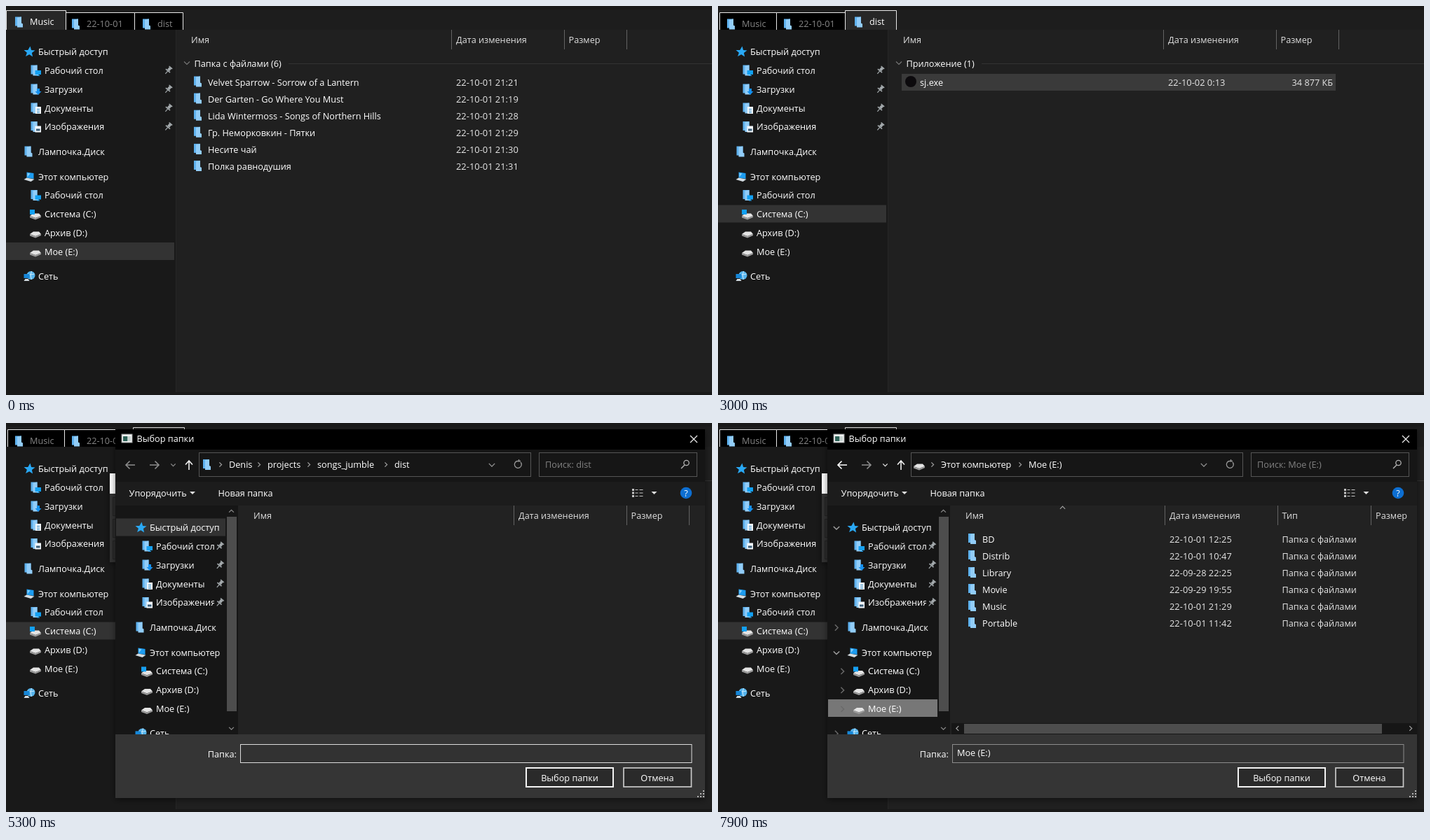
An HTML page for the animation above (8 s loop, 1007 by 556 pixels).

```html
<!DOCTYPE html>
<html lang="ru">
<head>
<meta charset="utf-8">
<title>File manager</title>
<style>
html, body { margin: 0; width: 100%; height: 100%; overflow: hidden; background: #202020; }
svg { display: block; width: 1007px; height: 556px; font-family: "Open Sans", "Noto Sans", sans-serif; }
text { white-space: pre; }
</style>
</head>
<body>
<svg id="stage" viewBox="0 0 1007 556" xmlns="http://www.w3.org/2000/svg"></svg>
<script>
const LOOP = 8000, STEP = 100;

// Drawing helpers
const txt = (x, y, s, { c = '#fff', z = 12.7, a = 'start' } = {}) =>
  `<text x="${x}" y="${y + 4.6}" fill="${c}" font-size="${z}" text-anchor="${a}">${s}</text>`;
const date = (x, y, s) => txt(x, y, s, { z: 12.9, c: '#e6e6e6' });
const named = id => id ? `id="${id}" ` : '';
const box = (x, y, x2, y2, fill, stroke = 'none', w = 1, id) =>
  `<rect ${named(id)}x="${x}" y="${y}" width="${x2 - x}" height="${y2 - y}" fill="${fill}" stroke="${stroke}" stroke-width="${w}"/>`;
const hot = (id, x, y, x2, y2, fill) => box(x, y, x2, y2, fill, 'none', 1, id);
const line = (d, c, w = 1, id) => `<path ${named(id)}d="${d}" fill="none" stroke="${c}" stroke-width="${w}"/>`;
const area = (d, c) => `<path d="${d}" fill="${c}"/>`;
const at = (x, y, s) => `<g transform="translate(${x} ${y})">${s}</g>`;
const group = (id, s, extra = '') => `<g id="${id}" ${extra}>${s}</g>`;
const turn = { down: 0, left: 90, up: 180, right: 270 };
const chev = (x, y, dir, c, r = 4, w = 1.2) =>
  `<path transform="translate(${x} ${y}) rotate(${turn[dir]})" d="M${-r} ${-r / 2}L0 ${r / 2}L${r} ${-r / 2}" fill="none" stroke="${c}" stroke-width="${w}"/>`;

// Icons, drawn around their centre
const folderArt = area('M-5.5-7.5h9v13h-9z', '#5fb2ef') + area('M-2.5-6.5l6-1v9l2 1v5h-8z', '#92cdf8');
const driveArt = area('M-8 2l5-3.5h8l3 3.5-8 3z', '#e4e4e4') + area('M-8 2l8 3 8-3v2l-8 3.5-8-3z', '#9b9b9b');
const badge = s => at(-1, 0, folderArt) + s;
const art = {
  star: area('M1-8L2.6-2.4 8-2 3.4 1.4 4.6 7-.2 3.8-5.4 6.6-3.6 1.2-8-2.4-2.2-2.6z', '#29a8f4'),
  desk: badge(box(-.5, 0, 8, 6, '#12a0f2') + box(2, 7, 6, 8, '#12a0f2')),
  down: badge(area('M2-1h4v4h2.5L4 8-.5 3H2z', '#1490ee')),
  docs: badge(box(0, -2, 8, 8, '#f3f8fc') + line('M2 1.5h4M2 4h4M2 6.3h4', '#3b8fc6')),
  pics: badge(box(-.5, -1, 8, 8, '#f3f8fc') + box(1, 3, 6.5, 6, '#3d5f79')),
  folder: folderArt,
  pc: area('M-4-6.5l10 1.5v8l-10-1.5z', '#1c9cf0') + area('M-3-5.3l4 .7-4 5z', '#86cdf9') + area('M-8 4l4-2.5L7 3.8 2 7z', '#d5dde2'),
  drive: driveArt,
  system: at(0, 1, driveArt) + box(-8, -6, -1, 1, '#12a0f2'),
  net: '<circle cx="2" cy="-1" r="6" fill="#56b4ec"/>' + line('M-3-3q5 2 10 0M3-7q-3 6 0 12', '#cdeafc') + box(-8, -3, 0, 3, '#1787d8') + area('M-6 4h4l2 3h-8z', '#d5dde2')
};
const icon = (name, x, y) => at(x, y, art[name]);
const pin = (x, y) => at(x, y, '<g transform="rotate(40)">' + box(-3, -6, 3, -4.5, '#a3a9ac') + box(-2, -5, 2, 0, '#a3a9ac') + box(-4, 0, 4, 1.6, '#a3a9ac') + box(-.6, 1, .6, 6.5, '#a3a9ac') + '</g>');
const appIcon = (x, y) => at(x, y, box(-7.5, -6, 7.5, 6, '#f4f4f4', '#8b8f90') + box(-5.5, -3, 1, 4, '#2d6458') + box(1, -3, 5.5, 4, '#c7d3d0'));

// Navigation pane: label, y, icon, level, arrow, pinned
const places = [
  ['Быстрый доступ', 65.5, 'star', 0, 'down'],
  ['Рабочий стол', 92, 'desk', 1, '', 1],
  ['Загрузки', 119, 'down', 1, '', 1],
  ['Документы', 146, 'docs', 1, '', 1],
  ['Изображения', 172.5, 'pics', 1, '', 1],
  ['Лампочка.Диск', 208, 'folder', 0, 'right'],
  ['Этот компьютер', 244, 'pc', 0, 'down'],
  ['Рабочий стол', 270.5, 'desk', 1, 'right'],
  ['Система (C:)', 297, 'system', 1, 'right'],
  ['Архив (D:)', 324, 'drive', 1, 'right'],
  ['Мое (E:)', 351, 'drive', 1, 'right'],
  ['Сеть', 386, 'net', 0, 'right']
];
function nav(list, id, pinX, clip) {
  let items = '', arrows = '';
  for (const [name, y, ico, level, arrow, pinned] of list) {
    const label = txt(level ? 55 : 46, y, name);
    items += icon(ico, level ? 42 : ico === 'folder' ? 32 : 33.5, y) + (pinned && clip ? `<g clip-path="url(#${clip})">${label}</g>` : label);
    if (pinned) items += pin(pinX, y);
    if (arrow) arrows += chev(level ? 18.5 : 10, y + .5, arrow, arrow === 'down' ? '#a0a0a0' : '#6a6a6a', 4.2, 1.4);
  }
  return items + group(id, arrows);
}

const head = (cols, seps, y) => cols.map(([x, s]) => txt(x, y, s, { c: '#dedede' })).join('') +
  seps.map(x => line(`M${x} ${y - 14}v28`, '#636363')).join('');
const section = s => chev(258, 81.5, 'down', '#777', 4) + txt(268.5, 82, s);

function tabs(active) {
  const names = ['Music', '22-10-01', 'dist'], edge = [2.5, 83.5, 183.5, 252.5], mark = [18.5, 99.5, 200.5];
  const one = i => {
    const on = i === active, g = on ? 2 : 0, y = on ? 6.5 : 9.5, l = edge[i] - g, r = edge[i + 1] + g;
    return `<path d="M${l} 34V${y}H${r}V34" fill="${on ? '#272727' : '#000'}" stroke="#e8e8e8"/>` +
      icon('folder', mark[i], on ? 23 : 26) + txt(mark[i] + 15.5, on ? 22.5 : 25, names[i], { c: on ? '#fff' : '#858585' });
  };
  return [0, 1, 2].filter(i => i !== active).map(one).join('') + one(active);
}

// Explorer contents
const albums = [
  ['Velvet Sparrow - Sorrow of a Lantern', '21'],
  ['Der Garten - Go Where You Must', '19'],
  ['Lida Wintermoss - Songs of Northern Hills', '28'],
  ['Гр. Неморковкин - Пятки', '29'],
  ['Несите чай', '30'],
  ['Полка равнодушия', '31']
];
const musicList = section('Папка с файлами (6)') + line('M403 82.5H1007', '#333') + albums.map(([s, m], i) => {
  const y = 109 + i * 24.1;
  return icon('folder', 273.5, y - 1) + txt(288, y, s) + date(642, y, '22-10-01 21:' + m);
}).join('');
const distList = hot('secHover', 245, 69, 1007, 95, '#2c2c2c') + hot('row', 262, 97, 881, 121, '#303030') +
  section('Приложение (1)') + line('M376 82.5H1007', '#333') +
  '<circle cx="275" cy="108" r="8" fill="#0c0a0d"/>' + txt(288, 109, 'sj.exe') +
  date(642, 109, '22-10-02 0:13') + txt(877, 109, '34 877 КБ', { a: 'end', c: '#e6e6e6' });

const explorer = box(0, 0, 1007, 556, '#191919') + box(0, 5, 1007, 34, '#1d1d1d') +
  box(243, 34, 1007, 552, '#202020') + line('M242.5 34V552', '#262626') +
  [0, 1, 2].map(i => group('tabs' + i, tabs(i))).join('') +
  group('headHover', box(245, 34, 635, 62, '#434343') + line('M618.5 34v28', '#333') + chev(627, 48, 'down', '#999', 3.5)) +
  head([[264, 'Имя'], [642, 'Дата изменения'], [802.5, 'Размер']], [635.5, 796.5, 885.5], 48) +
  group('list0', musicList) + group('list1', txt(625, 88, 'Эта папка пуста.', { a: 'middle' })) + group('list2', distList) +
  hot('pick', 0, 0, 240, 25, '#333') + nav(places, 'arrows', 231.5);

// Small application window
const field = (x2, y, s) => box(152.5, y, x2, y + 26, '#2f2f2f', '#202020') + txt(164.5, y + 14, s, { c: '#777', z: 15 });
const button = (y, s, dy) => box(513, y - 1, 585, y + 26, '#353535') + line(`M513 ${y + 26}H585.5V${y - 1}`, '#151515', 1.4) +
  line(`M513.5 ${y + 25}V${y - .5}H584`, '#434343') + txt(549, y + dy, s, { c: '#d8d8d8', z: 15, a: 'middle' });
const app = box(148, 72, 590, 199, '#fff') + appIcon(164.5, 86) + txt(178.5, 86, 'songjumble', { c: 'currentColor' }) +
  line('M477 86.5h11M563 81.5l10 10m0-10l-10 10', 'currentColor') + `<g opacity=".3">${line('M519.5 81.5h10v10h-10z', 'currentColor')}</g>` +
  group('appBody', box(148, 101, 590, 199, '#323232') + field(509, 106.5, 'откуда') + field(509, 137.5, 'куда') + field(224, 168.5, 'мб') +
    button(106.5, '...', 14.5) + button(137.5, '...', 14.5) + button(168.5, 'ok', 13.5) + line('M155.5 108v21', '#e0e0e0', 1, 'appCaret'));

// Folder picker: the same places without the second desktop entry
const sides = places.filter((p, i) => i !== 7).map(([s, y, ...rest]) => [s, y > 290 ? y - 26.6 : y, ...rest]);
const crumbs = parts => parts.map(([x, s]) => chev(x - 12, 59.5, 'right', '#a0a0a0', 3.2) + txt(x, 59.5, s)).join('');
const arrowL = c => line('M184 60h-13m5.5-5.5L171 60l5.5 5.5', c, 1.6);
const caretDown = (x, y) => area(`M${x - 4} ${y - 2}h8l-4 4z`, '#dedede');
const folders = [
  ['BD', '22-10-01 12:25'], ['Distrib', '22-10-01 10:47'], ['Library', '22-09-28 22:25'],
  ['Movie', '22-09-29 19:55'], ['Music', '22-10-01 21:29'], ['Portable', '22-10-01 11:42']
];
const search = s => txt(769, 59.5, 'Поиск: ' + s, { c: '#808080' });
const before = hot('crumbHover', 440, 43, 549, 76, '#2c2c2c') + arrowL('#8c8c8c') + chev(238.5, 60, 'down', '#8c8c8c', 3.2) +
  icon('folder', 286.5, 59.5) + crumbs([[318, 'Denis'], [373, 'projects'], [444, 'songs_jumble'], [554, 'dist']]) + search('dist') +
  hot('dlgHover', 334, 118, 724, 146, '#434343') +
  head([[353, 'Имя'], [731, 'Дата изменения'], [891.5, 'Размер']], [724.5, 885.5, 974.5], 132) +
  group('note', txt(665, 172.5, 'Нет элементов, удовлетворяющих условиям поиска.', { a: 'middle' })) +
  box(334.5, 459.5, 978, 485.5, '#333', '#dcdcdc') + line('M341.5 461v18', '#f0f0f0', 1, 'dlgCaret');
const after = arrowL('#fff') + chev(238.5, 60, 'down', '#e8e8e8', 3.2) + icon('drive', 287, 60) +
  crumbs([[318, 'Этот компьютер'], [443, 'Мое (E:)']]) + search('Мое (E:)') + chev(491.5, 121, 'up', '#a0a0a0', 3.6) +
  head([[353, 'Имя'], [644, 'Дата изменения'], [804.5, 'Тип'], [938, 'Размер']], [637.5, 798.5, 931.5], 132) +
  folders.map(([s, d], i) => {
    const y = 166.5 + i * 24;
    return icon('folder', 362.5, y - 1) + txt(377, y, s) + date(644, y, d) + txt(804.5, y, 'Папка с файлами', { c: '#e6e6e6' });
  }).join('') +
  box(333, 429, 997, 445, '#171717') + box(351, 430, 947, 444, '#4d4d4d') + chev(341.5, 436.5, 'left', '#a0a0a0', 3.4) + chev(988, 436.5, 'right', '#a0a0a0', 3.4) +
  box(334.5, 459.5, 978, 485.5, '#333', '#8c8c8c') + txt(341, 471.5, 'Мое (E:)');
let grip = '';
for (let r = 0; r < 3; r++) for (let k = 0; k <= r; k++) grip += box(994 - k * 4, 525 + r * 4, 996 - k * 4, 527 + r * 4, '#b5b5b5');

const dialog = box(156, 9, 997, 536, '#202020') + box(156, 9, 997, 38, '#000') + appIcon(172.5, 22) + txt(186.5, 22.5, 'Выбор папки') +
  line('M976 18l10 10m0-10l-10 10', '#e8e8e8', 1.3) + box(156, 38, 997, 84, '#191919') + box(156, 84, 997, 118, '#1e1e1e') +
  box(275.5, 42.5, 748.5, 76.5, '#191919', '#555') + box(760.5, 42.5, 985.5, 76.5, '#191919', '#555') +
  line('M205 60h13m-5.5-5.5L218 60l-5.5 5.5', '#8c8c8c', 1.6) + line('M261 67V54m-5 5.5L261 54l5 5.5', '#eee', 1.6) +
  chev(693, 60, 'down', '#999', 4.2) + line('M734 56a5 5 0 1 1-5-1.5h5m-2.5-2.5v3.5', '#999', 1.3) +
  '<circle cx="970.5" cy="57" r="3.7" fill="none" stroke="#b0b0b0" stroke-width="1.3"/>' + line('M968 60l-5 5', '#b0b0b0', 1.5) +
  txt(175.5, 100.5, 'Упорядочить') + caretDown(266, 100) + txt(302.5, 100.5, 'Новая папка') +
  [95, 99.5, 104].map(y => box(893, y - 1, 896, y + 2, '#c5c5c5') + line(`M897.5 ${y + .5}h4M903.5 ${y + .5}h5`, '#c5c5c5')).join('') + caretDown(924.5, 100) +
  '<circle cx="970" cy="100" r="8.3" fill="#0a6ed1"/>' + txt(970, 100, '?', { a: 'middle' }) +
  box(156, 118, 315, 445, '#191919') +
  `<g clip-path="url(#pane)">${hot('dlgHot', 157, 0, 313, 25, '#333')}${at(159, 84, nav(sides, 'dlgArrows', 146, 'names'))}</g>` +
  box(315, 118, 331, 445, '#171717') + box(315, 134, 329, 412, '#4d4d4d') + chev(321.5, 126, 'up', '#8c8c8c', 3.4) + chev(321.5, 436.5, 'down', '#8c8c8c', 3.4) +
  box(156, 445, 997, 536, '#343434') + txt(329, 473, 'Папка:', { a: 'end' }) + group('before', before) + group('after', after) +
  box(742, 493, 866, 520, '#2b2b2b', '#f4f4f4', 2) + txt(804, 507, 'Выбор папки', { a: 'middle' }) +
  box(881, 493, 977.5, 520, '#2b2b2b', '#c9c9c9', 1.7) + txt(929, 507, 'Отмена', { a: 'middle' }) + grip;

document.getElementById('stage').innerHTML =
  `<defs><clipPath id="pane"><rect x="156" y="118" width="159" height="327"/></clipPath>
  <clipPath id="names"><rect x="0" y="0" width="138" height="400"/></clipPath>
  <filter id="shade" x="-5%" y="-15%" width="110%" height="130%"><feDropShadow dx="0" dy="2" stdDeviation="5" flood-color="#000" flood-opacity=".5"/></filter></defs>` +
  explorer + group('app', app, 'filter="url(#shade)"') + group('dialog', dialog, 'filter="url(#shade)"');

// Animation
const nodes = {};
document.querySelectorAll('[id]').forEach(n => nodes[n.id] = n);
const show = (id, on) => nodes[id].setAttribute('display', on ? 'inline' : 'none');
const fade = (id, v) => nodes[id].setAttribute('opacity', v);
const fill = (id, c) => nodes[id].setAttribute('fill', c);
const moveY = (id, y) => nodes[id].setAttribute('y', y);
const ramp = (t, a, b) => Math.min(1, Math.max(0, (t - a) / (b - a)));
const within = (t, a, b) => t >= a && t < b;
const blink = (t, start) => Math.floor((t - start) / 265) % 2 === 0;
const zoom = (id, s, x, y) => nodes[id].setAttribute('transform', `translate(${x} ${y}) scale(${s}) translate(${-x} ${-y})`);

function draw(t) {
  const tab = t < 1400 ? 0 : t < 2300 ? 1 : 2;
  for (let i = 0; i < 3; i++) {
    show('tabs' + i, i === tab);
    show('list' + i, i === tab);
  }
  moveY('pick', tab === 2 ? 284.5 : 338);
  fade('arrows', (ramp(t, 100, 700) * .9 + ramp(t, 800, 1100) * .1) * (1 - ramp(t, 1200, 1600)));
  show('headHover', within(t, 2400, 2500));
  show('secHover', within(t, 2500, 2700));
  show('row', t >= 2700);
  fill('row', t < 3000 ? '#2b2b2b' : t < 3100 ? '#3a3a3a' : '#2f2f2f');

  const open = ramp(t, 3800, 4000);
  show('app', t >= 3800);
  show('appBody', t >= 3900);
  fade('app', t < 3900 ? .53 : t < 4000 ? .9 : 1);
  zoom('app', .975 + .025 * (1 - (1 - open) ** 2), 369, 135.5);
  nodes.app.style.color = t < 4900 ? '#000' : '#999';
  show('appCaret', t < 4900 && blink(t, 3885));

  const pop = ramp(t, 5000, 5300);
  show('dialog', t >= 5100);
  fade('dialog', pop);
  zoom('dialog', 1 - .06 * (1 - pop) ** 2, 576.5, 272.5);
  const done = t >= 7900;
  show('before', !done);
  show('after', done);
  show('note', t >= 5500);
  show('dlgHover', within(t, 5700, 5800));
  show('crumbHover', within(t, 6200, 6400));
  show('dlgCaret', t >= 5735 && blink(t, 5735));
  fade('dlgArrows', ramp(t, 6400, 7000));

  // Highlighted place in the picker
  moveY('dlgHot', t < 7100 ? 136.5 : t < 7300 ? 342 : t < 7400 ? 368.5 : 395);
  fill('dlgHot', t < 7100 ? '#333' : t < 7800 ? '#3a3a3a' : '#777');
}

function tick() {
  const t = performance.now() % LOOP;
  draw(Math.floor(t / STEP) * STEP);
  requestAnimationFrame(tick);
}
tick();
</script>
</body>
</html>
```
